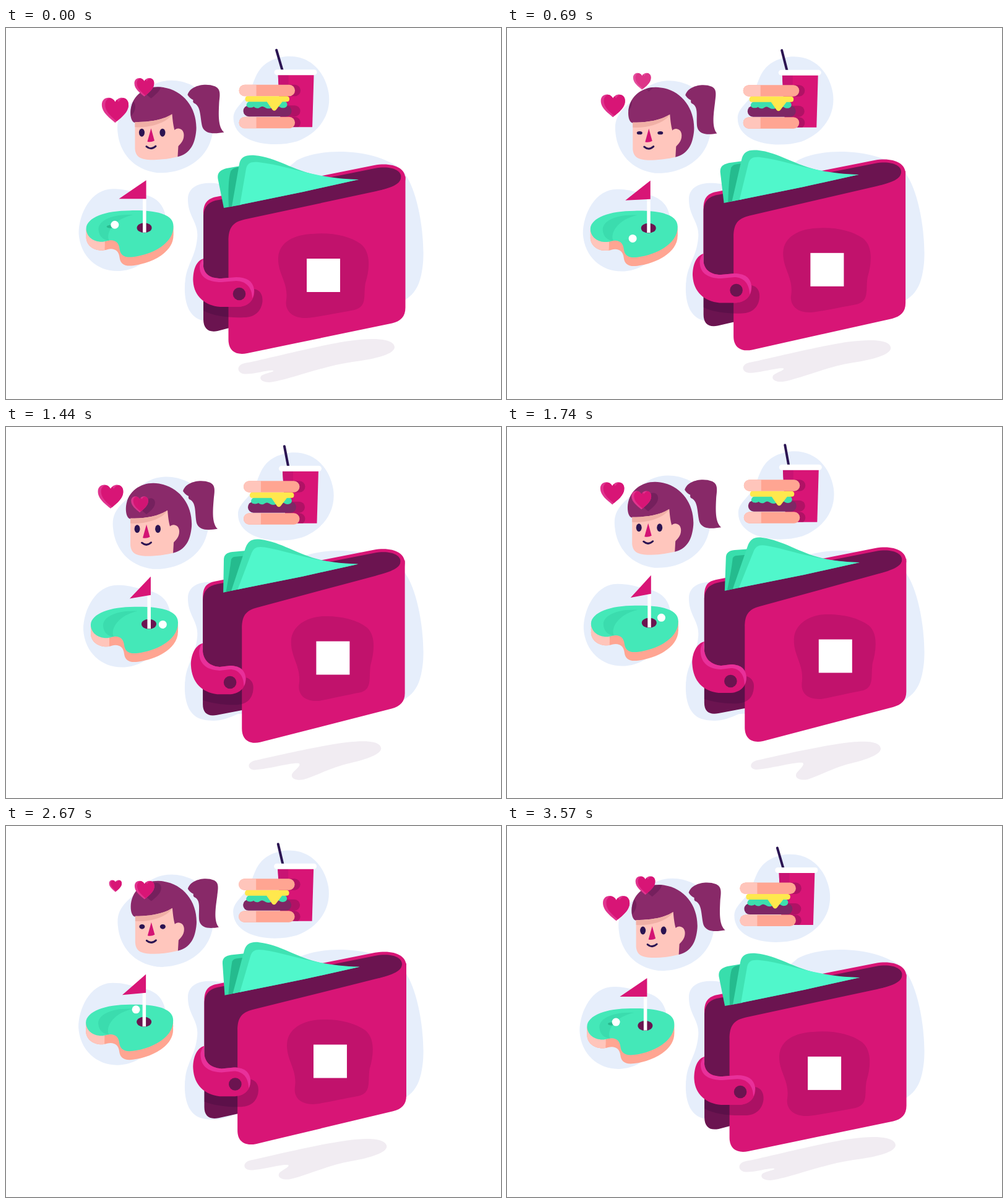
An HTML page for the animation above (3.6 s loop, 800 px wide and 600 px high).

```html
<!DOCTYPE html>
<html lang="en">
<head>
<meta charset="utf-8">
<title>Wallet</title>
<style>
html, body { margin: 0; width: 100%; height: 100%; overflow: hidden; background: #fff; }
svg { display: block; width: 800px; height: 600px; }
</style>
</head>
<body>
<svg viewBox="0 0 800 600" xmlns="http://www.w3.org/2000/svg">
<defs>
  <path id="dome" d="M209,153 C203,152 201,142 202,132 C205,108 225,95 246,95 C285,96 310,128 308,165 C306,188 298,203 278,208 Z"/>
  <path id="heart" d="M0,19 C-8,12 -20,4 -20,-8 C-20,-20 -5,-22 0,-12 C5,-22 20,-20 20,-8 C20,4 8,12 0,19 Z"/>
  <path id="turf" d="M129,324 C130,306 160,295 200,295 C245,294 270,302 270,320 C271,350 232,367 205,370 C190,372 184,366 183,357 C182,346 174,341 163,344 C148,349 129,341 129,324 Z"/>
  <g id="soil"><use href="#turf" y="4"/><use href="#turf" y="9"/><use href="#turf" y="14"/></g>
  <g id="buns"><rect x="376" y="91.5" width="90.5" height="18.5" rx="9.25"/><rect x="376" y="143.5" width="90.5" height="18.5" rx="9.25"/></g>
  <rect id="meat" x="383" y="125" width="78" height="18" rx="9"/>
  <path id="cup" d="M439,75 H497 L494.5,160 H444 Z"/>
  <clipPath id="domeClip"><use href="#dome"/></clipPath>
  <clipPath id="heartClip"><use href="#heart"/></clipPath>
  <clipPath id="cupClip"><use href="#cup"/></clipPath>
  <clipPath id="soilClip"><rect x="120" y="300" width="39" height="80"/></clipPath>
  <clipPath id="bunClip"><rect x="370" y="85" width="34" height="90"/></clipPath>
  <g id="love">
    <use href="#heart" fill="#e0348f"/>
    <g clip-path="url(#heartClip)"><use href="#heart" x="5" fill="#d81576"/></g>
  </g>
</defs>

<path fill="#e6eefb" d="M294,278 C293,256 315,247 345,252 C400,258 440,240 470,214 C510,192 600,195 640,230 C668,260 679,350 673,388 C668,425 655,445 600,455 C500,470 400,462 375,464 C355,473 340,478 318,473 C292,468 286,435 290,405 C294,380 306,370 309,340 C312,315 294,305 294,278 Z"/>
<path id="ground" fill="#f1ecf2"/>

<g id="head">
  <path fill="#e6eefb" d="M181,168 C177,135 202,125 220,105 C240,84 272,78 302,93 C330,108 342,150 332,180 C322,215 285,236 245,234 C207,229 184,202 181,168 Z"/>
  <path id="tail" fill="#882968"/>
  <use href="#dome" fill="#8a2a6a"/>
  <path fill="#ffc6bd" d="M209,152 C228,152 252,150 269,139 C270,150 271,158 273,165 C277,160 288,162 288,173 C288,183 282,187 279,191 L278,208 C265,211 252,213 240,213 C222,213 210,211 209,195 Z"/>
  <path fill="#f0b0a6" d="M209,152 C228,152 252,150 269,139 C262,152 235,162 209,160 Z"/>
  <ellipse class="eye" cx="220" cy="169" rx="4.5" fill="#2b1452"/>
  <ellipse class="eye" cx="253.5" cy="169" rx="4.5" fill="#2b1452"/>
  <path fill="#d31474" d="M235,162 L240.5,182 Q235,185 229,183.5 Z"/>
  <path fill="none" stroke="#2b1452" stroke-width="3" stroke-linecap="round" d="M227.5,191.5 Q235,198 242.5,191"/>
  <g clip-path="url(#domeClip)" fill="#4d1045" fill-opacity=".35">
    <use href="#heart" class="shade"/><use href="#heart" class="shade"/>
  </g>
  <use href="#love" class="heart"/><use href="#love" class="heart"/>
</g>

<g id="food">
  <path fill="#e6eefb" d="M367,145 C367,128 387,118 395,100 C403,78 408,52 450,46 C490,42 515,70 521,105 C526,140 505,170 470,183 C430,195 367,186 367,145 Z"/>
  <path id="straw" fill="none" stroke="#2b1452" stroke-width="4" stroke-linecap="round"/>
  <use href="#cup" fill="#d81576"/>
  <g clip-path="url(#cupClip)">
    <rect x="439" y="75" width="17" height="90" fill="#c81373"/>
    <g fill="#b01265"><use href="#buns" x="9"/><use href="#meat" x="14"/></g>
  </g>
  <rect x="433" y="67" width="69" height="9" rx="4.5" fill="#fff"/>
  <use href="#buns" fill="#ffa592"/>
  <use href="#buns" fill="#ffc5bb" clip-path="url(#bunClip)"/>
  <use href="#meat" fill="#7e2765"/>
  <path fill="#3ddfae" d="M394,118 H450 C456,121 455,128 449,129 C443,130 442,126 437,126 C430,127 428,131 422,130 C416,128 415,125 410,128 C406,131 402,129 400,127 C396,130 388,129 388,124 Q389,119 394,118 Z"/>
  <path fill="#ffe84d" d="M390,110 H453 Q457.5,110 457.5,114.5 Q457.5,119 453,119 H446 L436,132 Q433,135 430,132 L421,119 H390 Q386,119 386,114.5 Q386,110 390,110 Z"/>
</g>

<g id="golf">
  <path fill="#e6eefb" d="M117,332 C117,300 137,260 172,260 C195,260 205,266 222,269 C242,273 256,285 258,310 C262,350 240,366 220,380 C175,410 120,385 117,332 Z"/>
  <use href="#soil" fill="#ffa592"/>
  <use href="#soil" fill="#ffc5bb" clip-path="url(#soilClip)"/>
  <use href="#turf" fill="#44e8b8"/>
  <path fill="#3bdcae" d="M205,302 C170,300 148,312 149,326 C150,338 158,343 166,343.5 C160,330 175,308 205,302 Z"/>
  <ellipse cx="223" cy="323" rx="12" ry="8" fill="#6b1450"/>
  <rect x="220.5" y="247" width="5.5" height="83.5" fill="#fff"/>
  <path id="flag" fill="#d81576"/>
  <ellipse id="ballShade" rx="6" ry="2.5" fill="#29b88e"/>
  <circle id="ball" r="6.5" fill="#fff"/>
</g>

<g id="wallet">
  <path id="rim" fill="#d81576"/>
  <path id="inside" fill="#6b1450"/>
  <path id="bill1" fill="#38deac"/>
  <path id="bill2" fill="#25bb8e"/>
  <path id="bill3" fill="#40e2b3"/>
  <path id="bill4" fill="#50f7cb"/>
  <path id="front" fill="#d81576"/>
  <path id="patch" fill="#c1126c"/>
  <rect id="badge" width="54" height="54" fill="#fff"/>
  <path id="strapShade" fill="#380838" fill-opacity=".28"/>
  <path id="strap" fill="#d81576"/>
  <path id="strapEdge" fill="#e8309a"/>
  <circle id="button" r="10.3" fill="#6b1450"/>
</g>
</svg>
<script>
const LOOP = 3600;
const $ = id => document.getElementById(id);
const all = c => [...document.querySelectorAll(c)];
const set = (el, o) => { for (const k in o) el.setAttribute(k, o[k]); };
const lerp = (a, b, k) => a + (b - a) * k;
const smooth = (a, b, t) => {
  const u = Math.min(1, Math.max(0, (t - a) / (b - a)));
  return u * u * (3 - 2 * u);
};
const wave = (t, period) => Math.cos(2 * Math.PI * t / period);

// Paths of the closed and the opened pose; numbers alternate x, y.
const poses = {
  rim: ["M319,300 C319,284 325,276 340,273 L595,222 C625,217 645,226 645.5,243 L640,300 L350,350 L319,400 Z",
        "M319,274 C319,258 323,250 338,247 L595,196 C625,191 645,200 645.5,217 L640,274 L380,324 L319,374 Z"],
  inside: ["M319,304 C320,288 328,280 344,278 L596,227 C622,222 639,230 638.5,241 C638,253 622,259 600,264 L400,330 L380,480 L342,490 C327,493 319,486 319,471 Z",
           "M319,277 C320,261 328,254 344,251 L596,201 C622,196 639,204 638.5,215 C638,227 622,233 600,238 L420,320 L400,452 L342,463 C327,466 319,460 319,446 Z"],
  bill1: ["M352,291 L342.5,244 C341,234 346,230 356,227 L385,222 L380,286 Z",
          "M352,265 L354,212 C354,204 358,200 368,199 L396,197 L382,258 Z"],
  bill2: ["M360,289 C359,270 359,245 363,232 Q366,227 371,226 L385,223 L372,287 Z",
          "M356,264 C360,245 363,230 365,212 Q367,208 372,208 L394,206 L380,259 Z"],
  bill3: ["M365,288.5 L377,220 C379,209 387,205 402,206 C450,210 475,246 570,245 L480,265 Z",
          "M365,262 L389,193 C393,182 399,177 413,179 C462,186 485,219 570,219 L480,239 Z"],
  bill4: ["M378,286 L388,228 C390,218 396,216 408,217 C455,222 500,244 570,245 L480,265 Z",
          "M375,260 L398,203 C402,192 408,190 420,192 C460,199 500,217 570,219 L480,239 Z"],
  front: ["M359.5,345 C359.5,323 366,314 386,309.5 L598,264 C626,258 640,251 638.5,240 L645.5,240 L645.5,452 C645.5,467 638,474 624,477.5 L390,526 C370,530 359.5,521 359.5,504 Z",
          "M384.5,324 C384.5,304 390,295 409,290 L598,238 C626,231 640,224 638.5,213 L645.5,213 L645.5,428 C645.5,442 638,449 624,453 L414,508 C395,512 384.5,503 384.5,486 Z"],
  patch: ["M440,372 C441,345 468,334 495,333 C525,330 555,336 573,349 C590,362 588,390 581,412 C577,432 585,450 563,456 C535,461 508,467 486,469 C463,470 450,457 453,440 C457,412 439,398 440,372 Z",
          "M464,343 C465,318 490,304 515,303 C540,302 568,308 585,321 C600,334 597,361 591,382 C588,402 594,420 576,426 C550,431 525,437 508,440 C485,441 474,430 477,411 C480,384 463,369 464,343 Z"],
  strapShade: ["M319,438 C330,448 345,451 375,451 C395,450 402,437 401,422 C412,424 415,433 414.5,442 C413,458 402,468 385,468 C360,469 335,466 319,457 Z",
               "M319,418 C330,427 340,430 362,430 C380,429 387,417 387,403 C397,406 400,414 399,422 C398,437 389,446 374,447 C355,448 335,445 319,440 Z"],
  strap: ["M319,373 C306,377 302,394 302.5,410 C304,434 322,449 346,451 L376,451 C394,450 403,437 401,423 C399,409 389,403 372,403 L348,405 C328,405 316,397 319,373 Z",
          "M319,347 C306,350 299,367 299.5,383 C301,411 317,427 342,430 L362,430 C379,429 388,417 387,404 C386,390 376,384 362,384 L346,386 C327,384 316,372 319,347 Z"],
  strapEdge: ["M319,373 C316,397 328,405 348,405 L372,403 C389,403 399,409 401,423 C401,428 400,434 398,437 C398,420 388,409 372,409 L348,411 C325,411 312,402 313,384 Q315,376 319,373 Z",
              "M319,347 C316,372 327,384 346,386 L362,384 C376,384 386,390 387,404 C387,409 386,414 384,417 C384,400 375,390 362,390 L346,392 C324,391 312,380 313,359 Q315,350 319,347 Z"],
  ground: ["M628,516 C627,503 598,500 555,506 C500,514 410,538 386,542 C371,545 373,559 386,559.5 C402,560 425,552 432,554 C434,556 420,558 413,562 C408,568 414,573 426,573 C455,570 510,547 560,540 C600,535 628,527 628,516 Z",
           "M604,520 C602,508 580,507 545,511 C500,517 430,533 404,539 C390,543 392,554 404,554 C430,552 466,541 478,543 C482,547 473,553 468,560 C464,568 474,572 486,570 C505,564 530,550 556,544 C580,538 604,530 604,520 Z"]
};
const num = /-?\d+(\.\d+)?/g;
const morph = (id, kx, ky) => {
  const [a, b] = poses[id], to = b.match(num);
  let i = 0;
  $(id).setAttribute("d", a.replace(num, n => {
    const k = i % 2 ? ky : kx;
    return lerp(+n, +to[i++], k).toFixed(2);
  }));
};

// Smooth curve through (time, value) knots; the value gains `turn` each loop.
const knots = [0, 690, 1140, 1740, 2670, 3180];
const track = (vals, t, turn = 0) => {
  const n = knots.length;
  const at = i => {
    const c = Math.floor(i / n), j = i - c * n;
    return [knots[j] + c * LOOP, vals[j] + c * turn];
  };
  let i = n - 1;
  while (knots[i] > t) i--;
  const [p, q, r, s] = [-1, 0, 1, 2].map(d => at(i + d));
  const h = r[0] - q[0], u = (t - q[0]) / h;
  const m = (r[1] - p[1]) / (r[0] - p[0]) * h, w = (s[1] - q[1]) / (s[0] - q[0]) * h;
  const u2 = u * u, u3 = u2 * u;
  return q[1] * (2 * u3 - 3 * u2 + 1) + m * (u3 - 2 * u2 + u) + r[1] * (3 * u2 - 2 * u3) + w * (u3 - u2);
};

const hearts = all(".heart"), shades = all(".shade"), eyes = all(".eye");
const putHeart = (i, x, y, w, op) => {
  const size = `scale(${Math.max(w, 0.01) / 40})`;
  set(hearts[i], { transform: `translate(${x} ${y}) ${size}`, opacity: op });
  set(shades[i], { transform: `translate(${x + 11} ${y + 3}) ${size}`, opacity: op });
};

function drawHearts(t) {
  const t1 = t > 3200 ? t - LOOP : t;
  const grow = smooth(-360, -50, t1) * (1 - smooth(2400, 2950, t1));
  putHeart(0, 177, 132.5 - 0.011 * t1, (41 + 2.2 * wave(t1, 1150)) * grow, 1);

  const t2 = t < 1050 ? t + LOOP : t, u = (t2 - 1100) / 1000;
  const op = smooth(1060, 1500, t2) * (1 - smooth(4200, 4600, t2));
  putHeart(1, 224, 135 - 16.8 * u + 0.4 * u * u, 29 + 3 * wave(t2 - 1740, 930), op);
}

function drawHead(t) {
  const s = 4.5 * (wave(t, LOOP / 2) - 1);
  $("tail").setAttribute("d", `M294,108 C298,93 322,88 ${338 + s * .2},94 C${347 + s * .3},98 ${347 + s * .4},105 ${345 + s * .4},120 ` +
    `C${344 + s * .6},140 ${343 + s * .8},160 ${353 + s},${168.5 - s * .17} C${338 + s},${171 - s * .17} ${323 + s * .8},172 ${318 + s * .6},160 C${314 + s * .4},145 316,128 306,122 Q302,121 303,116 Q298,114 294,108 Z`);
  const shut = Math.max(0, 1 - Math.abs(t - 670) / 150, 1 - Math.abs(t - 2610) / 150);
  eyes.forEach(e => e.setAttribute("ry", Math.max(1, 6.5 - 4.5 * shut)));
}

function drawGolf(t) {
  const c = wave(t, LOOP);
  $("flag").setAttribute("d", `M226,246 V276 L${226 - 38.5 - 5.5 * c},${246 + 33.2 - 3.2 * c} Z`);
  const a = track([192, 111, 40, -23, -90, -128], t, -360) * Math.PI / 180;
  const x = 210 + 35.5 * Math.cos(a), y = 322 + 19 * Math.sin(a);
  set($("ball"), { cx: x, cy: y });
  set($("ballShade"), { cx: x - 7, cy: y + 3, opacity: smooth(200, 180, x) });
}

function drawWallet(t) {
  const kx = (1 - wave(t, LOOP)) / 2;
  const ky = track([0, .31, .69, 1, .66, .31], t);
  for (const id in poses) morph(id, kx, id === "ground" ? kx : ky);
  set($("badge"), { x: lerp(486, 504, kx), y: lerp(373, 343.5, ky) });
  set($("button"), { cx: lerp(377, 361.5, kx), cy: lerp(430, 411, ky) });
  set($("wallet"), { transform: `translate(${-1.5 * Math.sin(2 * Math.PI * t / LOOP)} 0)` });
}

function draw(t) {
  const a = 2 * Math.PI * t / LOOP + 50 * Math.PI / 180;
  const dx = 3.5 - 4.6 * Math.cos(a), dy = -3.2 + 4.4 * Math.sin(a);
  set($("head"), { transform: `translate(${-dx} ${dy})` });
  for (const id of ["food", "golf"]) set($(id), { transform: `translate(${dx} ${dy})` });
  const c = wave(t, LOOP);
  $("straw").setAttribute("d", `M${439.5 - 3 * c},35.5 L${447.2 - 1.2 * c},68`);
  drawHead(t);
  drawHearts(t);
  drawGolf(t);
  drawWallet(t);
}

const start = performance.now();
const tick = () => {
  draw((performance.now() - start) % LOOP);
  requestAnimationFrame(tick);
};
tick();
</script>
</body>
</html>
```
